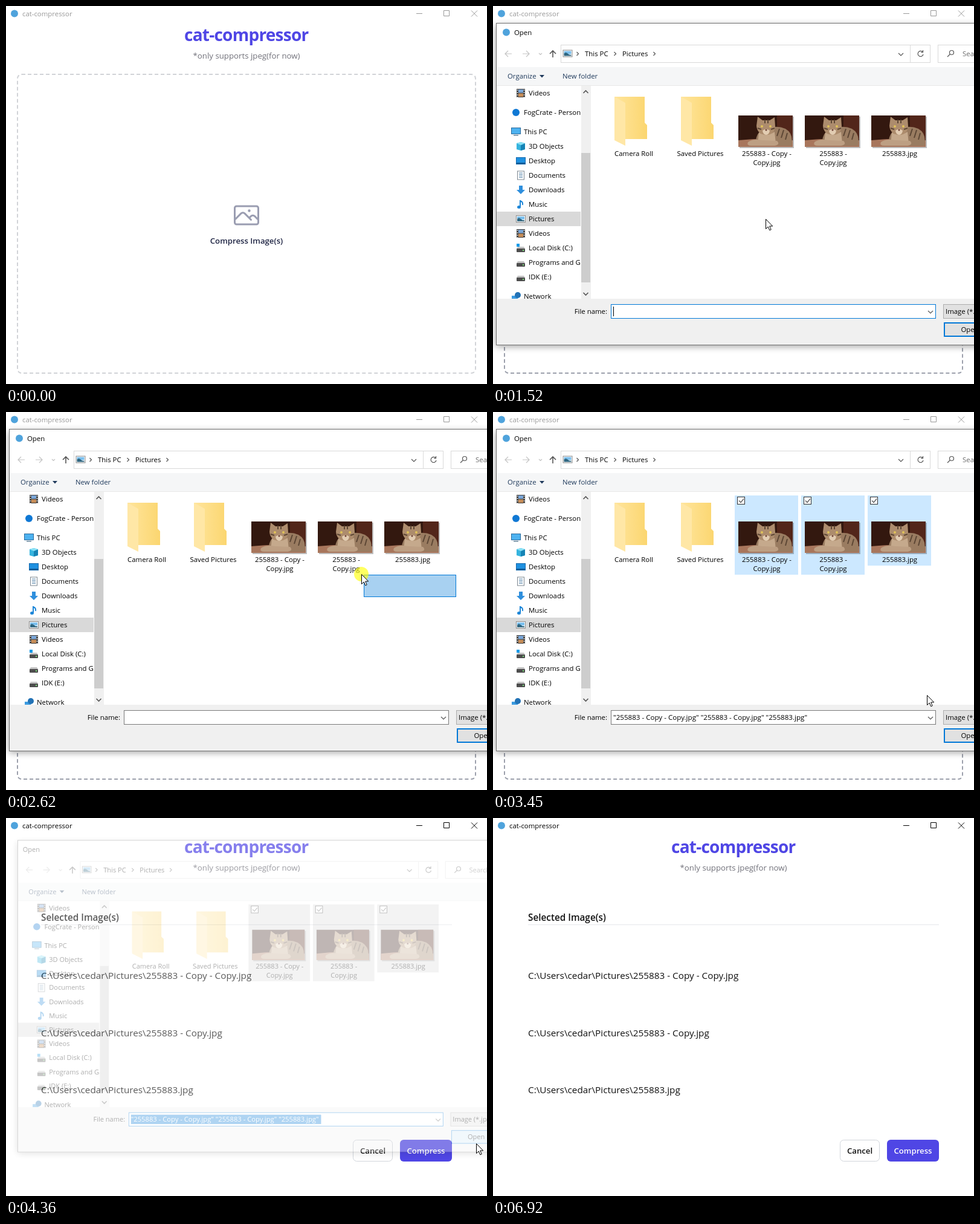
Write an HTML page that moves like this. It is 796 px wide and 625 px high and loops after 8000 ms.

```html
<!DOCTYPE html>
<html lang="en">
<head>
<meta charset="utf-8">
<title>cat-compressor</title>
<style>
html, body { margin: 0; width: 796px; height: 625px; overflow: hidden; background: #fff }
#drop { position: absolute; left: 18px; top: 112px; width: 760px; height: 496px; box-sizing: border-box; border: 2px dashed; border-radius: 8px }
#stage { position: absolute; left: 0; top: 0; font: 11.4px "Open Sans", "Noto Sans", sans-serif; white-space: pre }
.semi { font-weight: 600 }
.line { fill: none; stroke: #555; stroke-width: 1.2 }
</style>
</head>
<body>
<div id="drop"></div>
<svg id="stage" width="796" height="625"></svg>
<script>
const LOOP = 8000;
const stage = document.getElementById("stage");
const $ = id => document.getElementById(id);

// Markup helpers
const text = (x, y, s, attrs = "") => `<text x="${x}" y="${y}" ${attrs}>${s}</text>`;
const rect = (x, y, w, h, fill, attrs = "") =>
  `<rect x="${x}" y="${y}" width="${w}" height="${h}" fill="${fill}" ${attrs}/>`;
const path = (d, attrs = 'class="line"') => `<path d="${d}" ${attrs}/>`;
const fill = color => `fill="${color}"`;
const at = (x, y, body) => `<g transform="translate(${x} ${y})">${body}</g>`;
const middle = 'text-anchor="middle"';

// Icons, 16 pixels wide, centred on their origin
const drive = rect(-7, 1, 14, 6, "#4d4d4d", 'rx="1"') + path("M-5 -2H5L7 1H-7Z", fill("#c4c4c4")) + rect(3, 3, 2, 2, "#7be07b");
const picture = rect(-7.5, -5.5, 15, 11, "#fff", 'stroke="#8a8a8a"') + rect(-6, -4, 12, 5, "#7cc0ee") +
  path("M-6 4V0Q-3 -3 0 0T6 2V4Z", fill("#2f6680"));
const icons = {
  video: rect(-7, -7, 14, 14, "#3d3d3d") + rect(-4, -6, 8, 5.5, "#7aa7d9") + rect(-4, .5, 8, 5.5, "#c78d58") +
    path("M-5.5 -6V7M5.5 -6V7", 'stroke="#ddd" stroke-width="1.5" stroke-dasharray="2 2"'),
  cloud: `<circle r="6" fill="#0f78d4"/>`,
  pc: rect(-7.5, -6.5, 15, 10, "#4db2f0", 'stroke="#2a6a9c"') + rect(-4, 5, 8, 1.5, "#66869c"),
  cube: path("M-7 -5L0 -7L7 -5V5L0 7L-7 5Z", fill("#35b4df")) + path("M0 -2L7 -5V5L0 7Z", fill("#1583b5")) +
    path("M-7 -5L0 -7L7 -5L0 -2Z", fill("#8be1f5")),
  desktop: rect(-7.5, -5.5, 15, 11, "#1e90e0", 'stroke="#1769ab"') + rect(-7, 3, 14, 2, "#125a94"),
  doc: rect(-5.5, -7, 11, 14, "#fff", 'stroke="#7d8790"') + path("M-3 -4H3M-3 -1.5H3M-3 1H3M-3 3.5H3", 'stroke="#5d8aad"'),
  down: path("M-3 -7H3V0H7L0 7L-7 0H-3Z", fill("#2f8fdd")),
  music: path("M-1 -7V4M-1 -6Q4 -4 3 1", 'fill="none" stroke="#1c86d8" stroke-width="2"') +
    `<ellipse cx="-3" cy="4.5" rx="3" ry="2.5" fill="#1c86d8"/>`,
  picture,
  system: drive + rect(-7, -7, 5, 5, "#1a9be8"),
  drive,
  net: rect(-7, -1, 10, 7, "#3b9be0") + `<circle cx="3" cy="-2" r="5" fill="#2272b5"/>` + rect(-6, 7, 8, 1, "#678")
};

const places = [
  ["Videos", 144, "video"], ["FogCrate - Personal", 176, "cloud", 8], ["This PC", 208, "pc", 8],
  ["3D Objects", 232, "cube"], ["Desktop", 256, "desktop"], ["Documents", 280, "doc"],
  ["Downloads", 304, "down"], ["Music", 328, "music"], ["Pictures", 352, "picture"],
  ["Videos", 376, "video"], ["Local Disk (C:)", 400, "system"], ["Programs and Games (D:)", 424, "drive"],
  ["IDK (E:)", 448, "drive"], ["Network", 480, "net", 8]
];

const files = [
  { x: 400, bottom: 269, name: "255883 - Copy - Copy.jpg", rows: ["255883 - Copy -", "Copy.jpg"] },
  { x: 510, bottom: 269, name: "255883 - Copy.jpg", rows: ["255883 -", "Copy.jpg"] },
  { x: 620, bottom: 254, name: "255883.jpg", rows: ["255883.jpg"] }
];

const defs = `<defs>
  <linearGradient id="flap"><stop stop-color="#ffe59c"/><stop offset="1" stop-color="#fbd670"/></linearGradient>
  <symbol id="cat" viewBox="0 0 90 52">
    ${rect(0, 0, 90, 52, "#33180f") + rect(64, 0, 26, 40, "#52261a")}
    ${path("M0 41Q45 36 90 41V52H0Z", fill("#a8765c"))}
    ${path("M36 26Q60 14 78 22Q92 30 88 50H28Q28 34 36 26Z", fill("#9a7c61"))}
    ${path("M34 28Q46 36 60 27L62 46H32Z", fill("#c5a98c"))}
    ${path("M16 44Q24 38 40 41L64 42Q70 48 60 50H22Q13 50 16 44Z", fill("#bd9f83"))}
    ${path("M30 17L32 2L40 8H52L60 3L61 18Q60 32 46 32Q31 31 30 17Z", fill("#ad8c6d"))}
    ${path("M44 7V13M49 7V13M32 21L38 23M60 21L54 23M68 22L64 34M75 24L71 37M81 29L78 40", 'stroke="#5d4735" stroke-width="2"')}
    ${path("M40 25Q46 20 52 25Q51 32 46 32Q41 32 40 25Z", fill("#e2ccb2"))}
    <circle cx="39" cy="18" r="2" fill="#e0c35a"/><circle cx="53" cy="18" r="2" fill="#e0c35a"/>
    <circle cx="46" cy="24" r="1.5" fill="#704337"/>
  </symbol>
</defs>`;

const logo = (x, y, attrs = "") => `<circle cx="${x}" cy="${y}" r="6" fill="#4fa3dc" ${attrs}/>`;

const titleBar = logo(14, 12.5) + `<g id="bar">` + text(27, 17, "cat-compressor", 'fill="currentColor"') +
  path("M679 12.5H689M724.5 7.5H733.5V16.5H724.5ZM770 7.5L780 17.5M780 7.5L770 17.5", 'fill="none" stroke="currentColor"') + `</g>`;

const heading = text(295, 58, "cat-compressor", 'font-size="28" font-weight="700" letter-spacing="-.75" fill="#4f46e5"') +
  text(398, 87, "*only supports jpeg(for now)", middle + ' font-size="13.25" fill="#71717a"');

const photo = "M2.25 15.75l5.159-5.159a2.25 2.25 0 013.182 0l5.159 5.159m-1.5-1.5l1.409-1.409a2.25 2.25 0 013.182 0l2.909 2.909" +
  "m-18 3.75h16.5a1.5 1.5 0 001.5-1.5V6a1.5 1.5 0 00-1.5-1.5H3.75A1.5 1.5 0 002.25 6v12a1.5 1.5 0 001.5 1.5z" +
  "m10.5-11.25h.008v.008h-.008V8.25zm.375 0a.375.375 0 11-.75 0 .375.375 0 01.75 0z";
const dropPage = `<g id="dropPage">` +
  path(photo, 'transform="translate(374 322) scale(2)" fill="none" stroke="#9a9db1" stroke-width="1.5" stroke-linecap="round" stroke-linejoin="round"') +
  text(398, 393, "Compress Image(s)", middle + ' class="semi" font-size="13.2" fill="#1f2544"') + `</g>`;

const listPage = `<g id="listPage" fill="#111">` +
  text(58, 170, "Selected Image(s)", 'class="semi" font-size="15.3"') + rect(58, 176, 680, 1, "#e5e7eb") +
  files.map((f, i) => text(58, 266 + i * 94.5, "C:\\Users\\cedar\\Pictures\\" + f.name, 'font-size="15.3"')).join("") +
  rect(574.5, 532.5, 65, 35, "#fff", 'rx="6" stroke="#d1d5db"') +
  text(607, 555, "Cancel", middle + ' class="semi" font-size="13.2"') +
  rect(652, 532, 86, 36, "#4f46e5", 'rx="6" id="compress"') +
  text(695, 555, "Compress", middle + ' class="semi" font-size="13.2" fill="#fff"') + `</g>`;

// Open-file dialog
const chevron = (x, y) => path(`M${x - 1.5} ${y - 3}l3 3l-3 3`);
const caretDown = (x, y) => path(`M${x - 4} ${y - 2}l4 4l4 -4`);
const navigation = text(35, 48, "Open", 'id="dialogTitle"') + logo(22, 43.5, 'id="dialogLogo"') +
  path("M31 79H20M25 74L20 79L25 84M49 79H60M55 74L60 79L55 84M76 78l2.5 2.5l2.5 -2.5", 'class="line" style="stroke:#c4c4c4"') +
  path("M99 85V74M94 79L99 74L104 79", 'class="line" style="stroke-width:1.6"') +
  rect(112.5, 64.5, 611, 29, "#fff", 'stroke="#d9d9d9"') + rect(690, 65, 1, 29, "#d9d9d9") +
  at(123.5, 78.5, picture) + [140, 202, 267].map(x => chevron(x, 79)).join("") +
  text(152, 83, "This PC") + text(214, 83, "Pictures") + caretDown(675, 80) +
  path("M711 76A4.5 4.5 0 1 0 712 80M711.5 73V76.5H708") +
  rect(736.5, 64.5, 140, 29, "#fff", 'stroke="#d9d9d9"') +
  path("M752 84L756 80M755.5 77a3.5 3.5 0 1 0 7 0a3.5 3.5 0 1 0 -7 0") +
  text(777, 83, "Search Pictures", fill("#6d6d6d")) +
  rect(6, 101, 877, 31, "#f5f6f7") + rect(6, 131, 877, 1, "#e8e8e8") +
  text(24, 120, "Organize", fill("#1e395b")) + path("M77 114H85L81 118.5Z", fill("#1e395b")) +
  text(115, 120, "New folder", fill("#1e395b"));

const sidebar = `<svg x="6" y="132" width="139" height="352" viewBox="6 132 139 352">` +
  rect(6, 340, 139, 24, "#d9d9d9") +
  places.map(([name, y, icon, out = 0]) => at(46 - out, y, icons[icon]) + text(59 - out, y + 4, name)).join("") + `</svg>` +
  rect(146, 132, 16, 352, "#f0f0f0") + rect(146, 243, 15, 214, "#cdcdcd") +
  path("M149.5 144L153.5 140L157.5 144M149.5 474L153.5 478L157.5 474", 'class="line" style="stroke-width:1.6"');

const folder = (x, name) => at(x, 150, path("M0 0H50V43L54 47V70H0Z", 'fill="url(#flap)"') +
  path("M0 0L18 10V81L0 72Z", fill("#ffe7a6"))) + text(x + 32, 248, name, middle);

const fileItem = (f, i) => rect(f.x, 138, 105, f.bottom - 138, "none", `id="back${i}"`) +
  `<g id="box${i}">` + rect(f.x + 4.5, 140.5, 12, 12, "#fff", 'stroke="#333"') +
  path(`M${f.x + 7} 146.5l3 3l5 -6`, `class="line" id="tick${i}"`) + `</g>` +
  rect(f.x + 8, 183, 90, 52, "#000", 'opacity=".25"') +
  `<use href="#cat" x="${f.x + 6}" y="181" width="90" height="52"/>` +
  f.rows.map((row, n) => text(f.x + 53, 248 + n * 15, row, middle)).join("");

const footer = rect(6, 484, 877, 76, "#f0f0f0") + text(189, 509, "File name:", 'text-anchor="end"') +
  rect(195.5, 493.5, 537, 23, "#fff", 'id="field"') + rect(199, 497, 325, 16, "#0078d7", 'id="mark"') +
  text(199, 509, "", 'id="names" font-size="11.6"') + rect(199, 497, 1, 16, "#000", 'id="caret"') +
  caretDown(724, 506) +
  rect(745.5, 493.5, 130, 23, "#e1e1e1", 'stroke="#adadad"') + text(749, 509, "Image (*.jpg)") +
  rect(747, 524, 88, 22, "#e1e1e1", 'id="open" stroke="#0078d7"') + text(789, 539, "Open", middle);

const dialog = `<g id="dialog">` + rect(5, 32, 878, 531, "#000", 'opacity=".38" style="filter:blur(6px)"') +
  rect(5.5, 28.5, 877, 532, "#fff", 'stroke="#707070"') + navigation + sidebar +
  folder(201, "Camera Roll") + folder(311, "Saved Pictures") + files.map(fileItem).join("") + footer + `</g>`;

const cursor = `<g id="cursor"><circle id="press" r="12" fill="#ff0" opacity=".62"/>` +
  path("M.5 .5V16.5L4.2 13L6.8 18.8L9.2 17.7L6.7 12H11.7Z", 'fill="#fff" stroke="#000"') + `</g>`;

stage.innerHTML = defs + titleBar + heading + dropPage + listPage + dialog +
  rect(0, 0, 0, 0, "#0078d7", 'id="band" fill-opacity=".34" stroke="#0078d7"') + cursor;

// Motion
const track = [
  [450, 790, 410], [800, 449, 352], [1520, 450, 352], [1850, 640, 235], [2250, 745, 306], [2350, 745, 306],
  [2620, 589, 268], [2870, 425, 205], [3040, 425, 205], [3450, 718, 468], [3720, 778, 538], [4360, 778, 538],
  [4630, 668, 584], [4840, 629, 584], [5240, 629, 584], [5580, 701, 549], [6790, 701, 549], [6850, 744, 558]
];
const presses = [[860, 960], [2350, 3040], [3850, 3950], [6110, 6240]];
const START = [745, 306];
const BAND_LAG = 7;

const clamp = u => Math.max(0, Math.min(1, u));
const within = (t, a, b) => t >= a && t < b;
const show = (id, on) => { $(id).style.display = on ? "" : "none"; };
const set = (id, attrs) => { for (const k in attrs) $(id).setAttribute(k, attrs[k]); };
const mix = (a, b, u) => `rgb(${a.map((v, i) => v + (b[i] - v) * u)})`;

function pointer(t) {
  const n = track.findIndex(k => k[0] > t);
  if (n === 0) return track[0].slice(1);
  if (n < 0) return track.at(-1).slice(1);
  const [t0, x0, y0] = track[n - 1], [t1, x1, y1] = track[n];
  const u = (t - t0) / (t1 - t0);
  return [x0 + (x1 - x0) * u, y0 + (y1 - y0) * u];
}

// Free corner of the selection rectangle, which trails the pointer
const bandCorner = t => pointer(t - BAND_LAG).map(v => Math.round(v) + .5);

function drawDialog(t, x, y) {
  const closing = t >= 4250;
  const a = closing ? (1 - clamp((t - 4290) / 160)) ** 2 : 1 - (1 - clamp((t - 1000) / 200)) ** 2;
  show("dialog", a > 0);
  if (!a) return;
  const scale = 1 - (closing ? .046 : .055) * (1 - a);
  set("dialog", { opacity: a, transform: `translate(444 294) scale(${scale}) translate(-444 -294)` });
  show("dialogLogo", !closing);
  set("dialogTitle", { x: closing ? 14 : 35 });

  const accepted = t >= 3850;
  const [sx, sy] = bandCorner(Math.min(t, 2900));
  const chosen = [];
  files.forEach((f, i) => {
    const picked = t > 2360 && sx < f.x + 105 && sy < f.bottom;
    const hover = within(t, 1200, 2350) && x > f.x && x < f.x + 105 && y > 138 && y < f.bottom;
    if (picked) chosen.push(f.name);
    set("back" + i, { fill: picked ? (accepted ? "#d9d9d9" : "#cce8ff") : hover ? "#e5f3ff" : "none" });
    show("box" + i, picked || hover);
    show("tick" + i, picked);
  });

  const typing = t < 2380;
  $("names").textContent = chosen.length > 1 ? chosen.map(n => `"${n}"`).join(" ") : chosen.join("");
  set("names", { fill: accepted ? "#fff" : "#000" });
  set("field", { stroke: typing || accepted ? "#0078d7" : "#7a7a7a" });
  show("mark", accepted);
  show("caret", typing && Math.floor((t - 1000) / 530) % 2 === 0);
  const overOpen = x > 746 && y > 523;
  set("open", { fill: overOpen ? "#d5e9f8" : "#e1e1e1", "stroke-width": overOpen ? 1 : 2 });
}

function draw(t) {
  const [x, y] = pointer(t);
  const listed = t >= 4300;
  show("drop", !listed);
  show("dropPage", !listed);
  show("listPage", listed);
  $("drop").style.borderColor = mix([209, 211, 215], [156, 160, 172], clamp((t - 470) / 150));
  $("bar").style.color = listed ? "#000" : within(t, 870, 1150) ? "#6a6a6a" : "#999";
  const hover = clamp((t - 5450) / 120) * (t < 6850);
  set("compress", { fill: mix([79, 70, 229], [67, 56, 202], hover) });

  drawDialog(t, x, y);

  const dragging = within(t, 2360, 3040);
  show("band", dragging);
  if (dragging) {
    const [bx, by] = bandCorner(t);
    set("band", { x: bx, y: by, width: Math.max(0, START[0] - .5 - bx), height: Math.max(0, START[1] - .5 - by) });
  }

  show("cursor", within(t, 450, 6920));
  set("cursor", { transform: `translate(${Math.round(x)} ${Math.round(y)})` });
  show("press", presses.some(([a, b]) => within(t, a, b)));
}

function tick() {
  draw(performance.now() % LOOP);
  requestAnimationFrame(tick);
}
tick();
</script>
</body>
</html>
```
